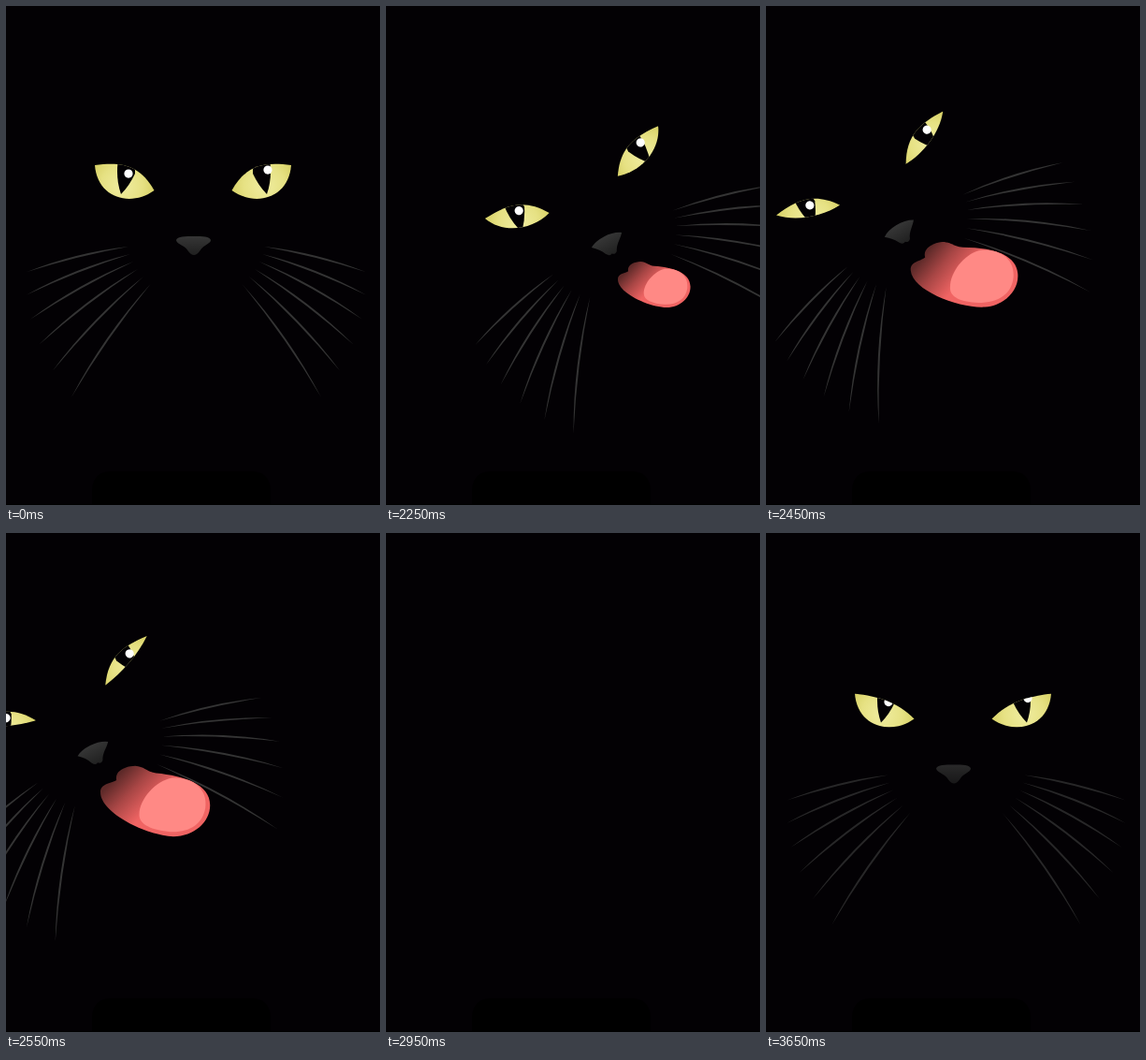
Animation, 400 px wide and 533 px high, one loop 3.75 s. Source, as an HTML page:

```html
<!DOCTYPE html>
<html lang="en">
<head>
<meta charset="utf-8">
<title>Black cat</title>
<style>
html, body { margin: 0; width: 100%; height: 100%; overflow: hidden; background: #030104; }
svg { display: block; width: 100%; height: 100%; }
</style>
</head>
<body>
<svg viewBox="0 0 400 533">
  <defs>
    <radialGradient id="iris" gradientUnits="userSpaceOnUse" cx="124" cy="192" r="40">
      <stop offset="0" stop-color="#f0eda0"/>
      <stop offset=".55" stop-color="#e6e183"/>
      <stop offset="1" stop-color="#d3cc5c"/>
    </radialGradient>
    <linearGradient id="snout" x1="0" y1="0" x2="0" y2="1">
      <stop offset="0" stop-color="#363636"/>
      <stop offset="1" stop-color="#202020"/>
    </linearGradient>
    <linearGradient id="flesh" gradientUnits="userSpaceOnUse" x1="116" y1="264" x2="150" y2="298">
      <stop offset="0" stop-color="#5e2a29"/>
      <stop offset=".45" stop-color="#a84645"/>
      <stop offset="1" stop-color="#f06463"/>
    </linearGradient>
    <clipPath id="lids"><path id="lidShape"/></clipPath>
  </defs>
  <rect width="400" height="533" fill="#030104"/>
  <path d="M92 533V519Q92 497 114 497H261Q283 497 283 519V533ZM0 532H400V533H0Z"/>
  <g id="head">
    <g id="muzzle">
      <g id="whiskers" fill="#343434"></g>
      <path id="nose" fill="url(#snout)"/>
    </g>
    <g clip-path="url(#lids)">
      <rect x="90" y="160" width="72" height="52" fill="url(#iris)"/>
      <path id="pupil" d="M120 164Q117 184 123 201Q132 192 138 179V164Z" fill="#030104"/>
      <circle id="glintL" cx="131" r="4.6" fill="#fff"/>
    </g>
    <g transform="matrix(-1 0 0 1 400 0)" clip-path="url(#lids)">
      <rect x="90" y="160" width="72" height="52" fill="url(#iris)"/>
      <use href="#pupil" x="-2"/>
      <circle id="glintR" cx="120" r="4.6" fill="#fff"/>
    </g>
    <g id="tongue">
      <path fill="url(#flesh)" d="M101 278C101 268 112 269 118 265C116 255 128 250 138 250C148 251 150 256 160 258C190 261 217 270 217 292C217 310 200 325 178 325C150 324 101 300 101 278Z"/>
      <path fill="#ff8985" d="M142 302C142 285 160 266 177 263C200 262 215 276 212 295C209 312 195 321 175 320C155 318 142 312 142 302Z"/>
    </g>
  </g>
</svg>
<script>
const LOOP = 3750, TURN = 2000, GONE = 2950, WAKE = 3450, STEP = 100;
const CX = 203.5, CY = 257;
const NOSE_FRONT = "M182 250C183 246 192 246 201 246C210 246 218 246 219 250C219 254 211 255 207 262Q201 270 195 262C191 255 183 255 182 250Z";
const NOSE_TURNED = "M181 251Q187 247 198 247Q209 247 217 252C213 257 206 260 203 267Q200 270 197 267Q194 269 191 264Q188 257 181 251Z";

const $ = id => document.getElementById(id);
const set = (id, name, value) => $(id).setAttribute(name, value);
const show = (id, on) => { $(id).style.display = on ? "" : "none"; };
const mix = (a, b, k) => a + (b - a) * k;
const mixPoint = (p, q, k) => `${mix(p[0], q[0], k)} ${mix(p[1], q[1], k)}`;
const after = (n, from, rate, power) => rate * Math.max(0, n - from) ** power;

// Whiskers fan out downwards from a curved row of roots.
function whisker(i, side) {
  const x = CX + side * (72.5 - 1.2 * i - .7 * i * i), y = CY + 8 * i;
  const angle = (14 + 7.2 * i + .2 * i * i) * Math.PI / 180;
  const len = 112 + 7 * i;
  const dx = side * len * Math.cos(angle), dy = len * Math.sin(angle);
  const bend = off => `${x + dx / 2 + side * off * Math.sin(angle)} ${y + dy / 2 - off * Math.cos(angle)}`;
  const arc = len * .05;
  return `<path d="M${x} ${y}Q${bend(arc + 2)} ${x + dx} ${y + dy}Q${bend(arc - 2)} ${x} ${y}Z"/>`;
}

// low and up tell how far each lid bulges from the line between the corners.
function lidPath(low, up) {
  const outer = "95 170", inner = "158.5 197";
  const u1 = mixPoint([116, 180], [123.5, 166.5], up);
  const u2 = mixPoint([138, 188], [142.5, 169], up);
  const l1 = mixPoint([137, 188], [133, 216], low);
  const l2 = mixPoint([116, 179], [97, 206], low);
  return `M${outer}C${u1} ${u2} ${inner}C${l1} ${l2} ${outer}Z`;
}

const facing = up => ({
  x: CX, y: CY + 3 * (1 - up), turn: 0, low: .97, up, tongue: 0, glow: (1 + up) / 2
});

// The head tilts, then sweeps off to the left while the tongue comes out.
const sweeping = n => ({
  x: 258.5 - after(n, 1.6, 42.7, 1.075),
  y: 265.5 - 6.4 * n - after(n, 5, 12.2, 1.7),
  turn: -24.3 - 1.9 * n + after(n, 4, 7, 1.4),
  low: .8 - .1 * n - .0052 * n * n,
  up: .9,
  tongue: Math.min(n / 3, .86 + .03 * n),
  glow: 1
});

function poseAt(time) {
  if (time < TURN) return facing(1);
  if (time < GONE) return sweeping(Math.max(0, Math.floor((time - TURN - 50) / STEP)));
  if (time < WAKE) return null;
  return facing(Math.floor((time - WAKE) / STEP) / 2 - .5);
}

function draw(time) {
  const pose = poseAt(time);
  show("head", pose);
  if (!pose) return;
  const { x, y, turn, low, up, tongue, glow } = pose;
  set("head", "transform", `translate(${x} ${y}) rotate(${turn}) translate(${-CX} ${-CY})`);
  set("lidShape", "d", lidPath(low, up));
  set("glintL", "cy", 179 + (1 - low) * 1.5);
  set("glintR", "cy", 175 + (1 - low) * 4);
  set("nose", "d", turn ? NOSE_TURNED : NOSE_FRONT);
  set("muzzle", "opacity", glow);
  show("tongue", tongue);
  set("tongue", "transform",
    `translate(${CX} ${CY}) rotate(26.5) translate(10 32) scale(${tongue}) translate(-109.5 -266.5)`);
}

$("whiskers").innerHTML = [-1, 1].flatMap(side =>
  Array.from({ length: 6 }, (_, i) => whisker(i, side))).join("");

const start = performance.now();
function tick() {
  draw((performance.now() - start) % LOOP);
  requestAnimationFrame(tick);
}
tick();
</script>
</body>
</html>
```
